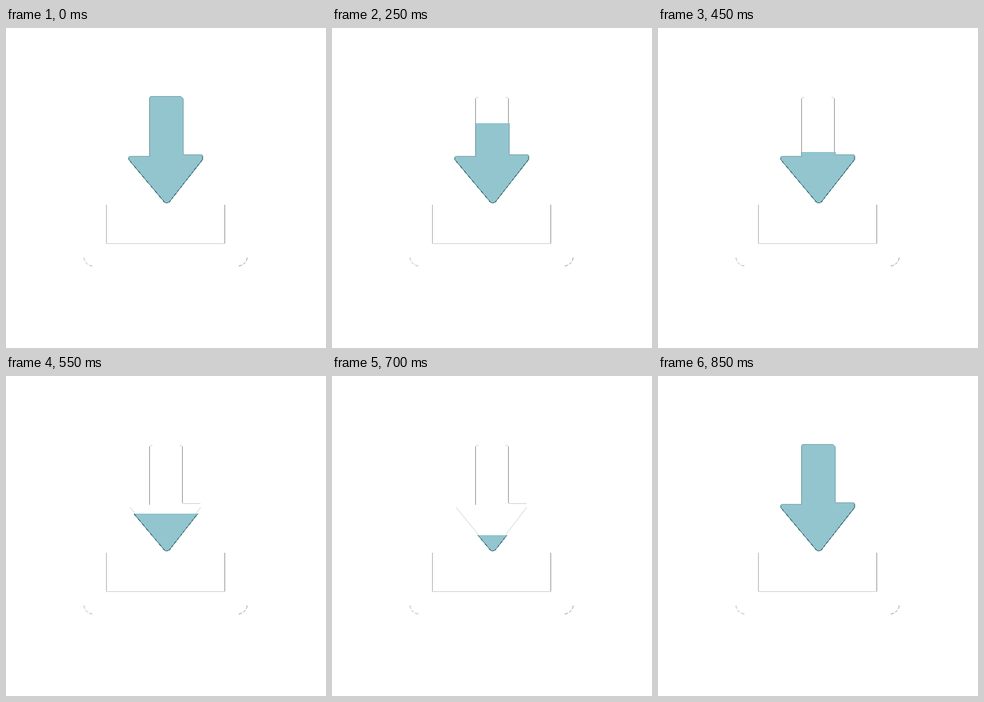
Animation of 400 by 400 pixels, one loop 1050 ms. Source, as an HTML page:

```html
<!DOCTYPE html>
<html lang="en">
<head>
<meta charset="utf-8">
<title>Download arrow</title>
<style>
  html, body { margin: 0; width: 100%; height: 100%; overflow: hidden; background: #fff; }
  svg { display: block; width: 100vw; height: 100vh; }
  path { fill: none; stroke-width: 1; }
  .line { stroke: #a4a4a4; }
  .soft { stroke: #bcbcbc; }
  .faint { stroke: #d8d8d8; }
  .arrow { fill: #92c5ce; stroke: #6b989f; stroke-width: .8; }
  .edge { stroke: #4f7f87; shape-rendering: crispEdges; }
</style>
</head>
<body>
<svg viewBox="0 0 400 400">
  <defs>
    <clipPath id="level"><rect id="cut" x="150" y="85" width="100" height="136"/></clipPath>
  </defs>

  <!-- tray -->
  <path class="soft" d="M125.5 221V269"/>
  <path class="line" d="M273.5 221V269"/>
  <path class="faint" d="M125 269.5H274"/>
  <path class="soft" stroke-dasharray="4 2" d="M97.5 287Q98.5 296 108 297.5"/>
  <path class="line" stroke-dasharray="4 2" d="M301.5 287Q300 296 291 297.5"/>

  <!-- empty arrow -->
  <path class="line" d="M179.5 161V88M220.5 88V159"/>
  <path class="faint" d="M180 88Q180 86.5 183 86.5M217 86.5Q220 86.5 220 88M221 159.5H243"/>
  <path class="faint" d="M155 164L198 217M243.5 164L203 217"/>

  <!-- remaining fill -->
  <g clip-path="url(#level)">
    <path class="arrow" d="M179.4 160.4V88Q179.4 85.4 182 85.4H218.5L221.6 88.5V158.4H244Q246 158.4 246 160.5V164.5L204.5 217Q200.5 220.5 197.5 217L153.4 164.5V162Q153.4 160.4 155.5 160.4Z"/>
    <path class="edge" d="M153.5 161.5V164.5L197.5 217Q200.5 220 204.5 217L245.5 164.5V160"/>
  </g>
</svg>
<script>
  const LOOP = 1050, STEP = 50, REFILL = 17;
  // [step, top edge of the fill]
  const keys = [[0, 85], [1, 87], [2, 95], [5, 119], [9, 155], [11, 172], [14, 199], [16, 217]];
  const cut = document.getElementById('cut');

  function levelAt(step) {
    if (step >= REFILL) return 85;
    const i = Math.max(1, keys.findIndex(k => k[0] >= step));
    const [s0, y0] = keys[i - 1], [s1, y1] = keys[i];
    return Math.round(y0 + (y1 - y0) * (step - s0) / (s1 - s0));
  }

  function draw(time) {
    const top = levelAt(Math.floor((time % LOOP) / STEP));
    cut.setAttribute('y', top);
    cut.setAttribute('height', 221 - top);
  }

  function tick(now) {
    draw(now);
    requestAnimationFrame(tick);
  }

  draw(0);
  requestAnimationFrame(tick);
</script>
</body>
</html>
```
